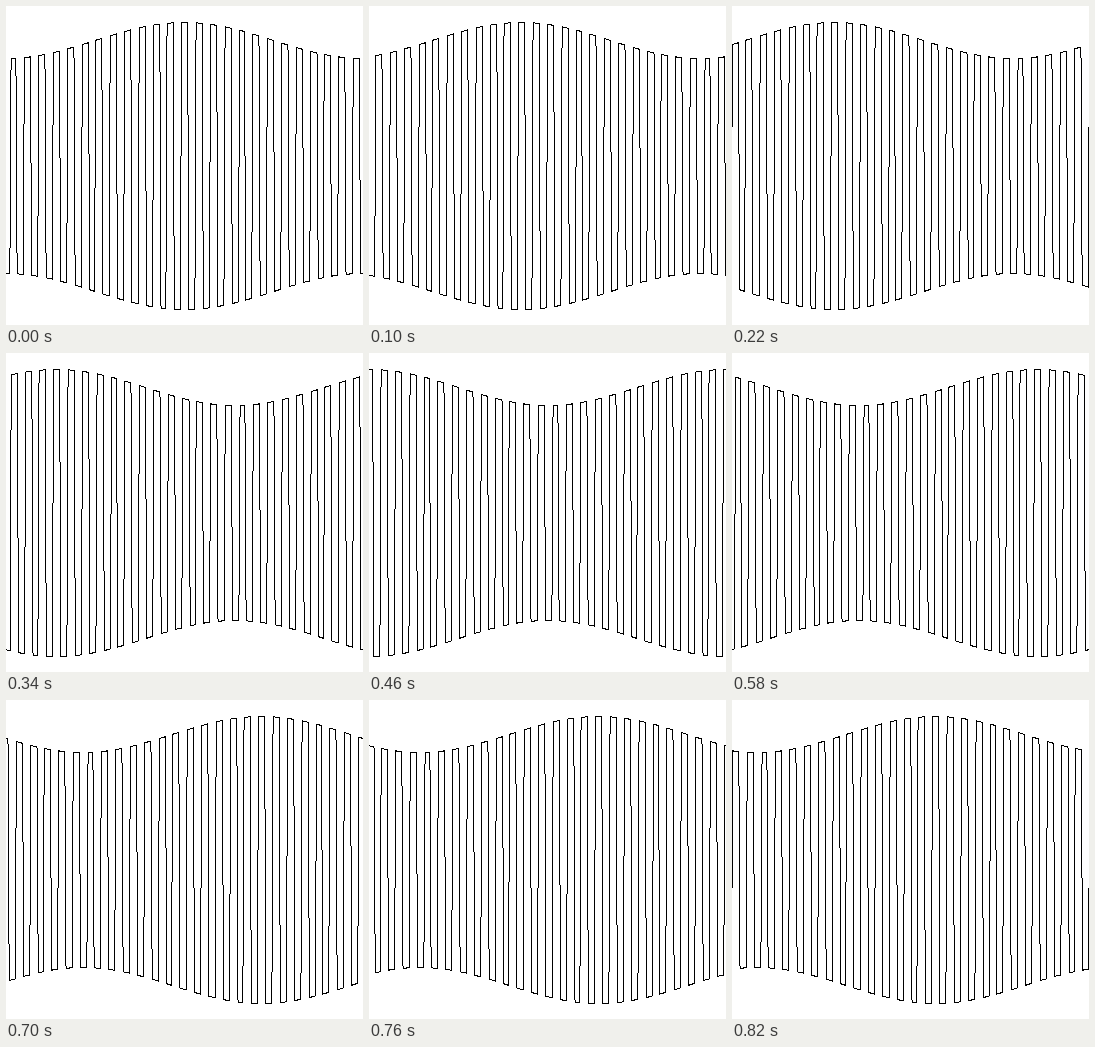
Write an HTML page with a canvas that moves like this. It is 357 px wide and 319 px high and loops after 880 ms.

```html
<!DOCTYPE html>
<html lang="en">
<head>
<meta charset="utf-8">
<title>Modulated square wave</title>
<style>
  html, body { margin: 0; width: 100%; height: 100%; overflow: hidden; background: #fff; }
  canvas { display: block; width: 357px; height: 319px; image-rendering: pixelated; }
</style>
</head>
<body>
<canvas id="stage" width="357" height="319"></canvas>
<script>
const W = 357, H = 319;
const SAMPLES = 295, PITCH = 1.2092, OFFSET = 0.23;
const PERIOD = 11.816, PHASE = 3.02; // carrier, in samples
const STEPS = 14, FIRST = 100, HOLD = 60, LOOP = 880;

const ctx = document.getElementById('stage').getContext('2d');
const strip = document.createElement('canvas');
strip.width = W;
strip.height = H;
const pen = strip.getContext('2d');

function sample(i) {
  const x = OFFSET + i * PITCH;
  const turn = (i - PHASE) / PERIOD;
  const up = turn - Math.floor(turn) < 0.5;
  const amp = 125.5 + 18 * Math.cos(2 * Math.PI * (x / W - 0.5));
  return { x, y: 160 + (up ? -amp : amp) };
}

// Hard-edged line, one pixel wide
function line(a, b) {
  const n = Math.ceil(Math.max(Math.abs(b.x - a.x), Math.abs(b.y - a.y)));
  for (let j = 0; j <= n; j++) {
    const t = j / n;
    pen.fillRect(Math.floor(a.x + (b.x - a.x) * t), Math.floor(a.y + (b.y - a.y) * t), 1, 1);
  }
}

for (let i = -1; i <= SAMPLES; i++) line(sample(i), sample(i + 1));

function roundHalfEven(v) {
  const f = Math.floor(v);
  return v - f === 0.5 ? f + f % 2 : Math.round(v);
}

function draw(now) {
  const t = now % LOOP;
  const step = t < FIRST ? 0 : Math.floor((t - FIRST) / HOLD) + 1;
  const shift = roundHalfEven(step * W / STEPS);
  ctx.fillStyle = '#fff';
  ctx.fillRect(0, 0, W, H);
  ctx.drawImage(strip, -shift, 0);
  ctx.drawImage(strip, W - shift, 0);
}

let start;
function tick(now) {
  if (start === undefined) start = now;
  draw(now - start);
  requestAnimationFrame(tick);
}
draw(0);
requestAnimationFrame(tick);
</script>
</body>
</html>
```
